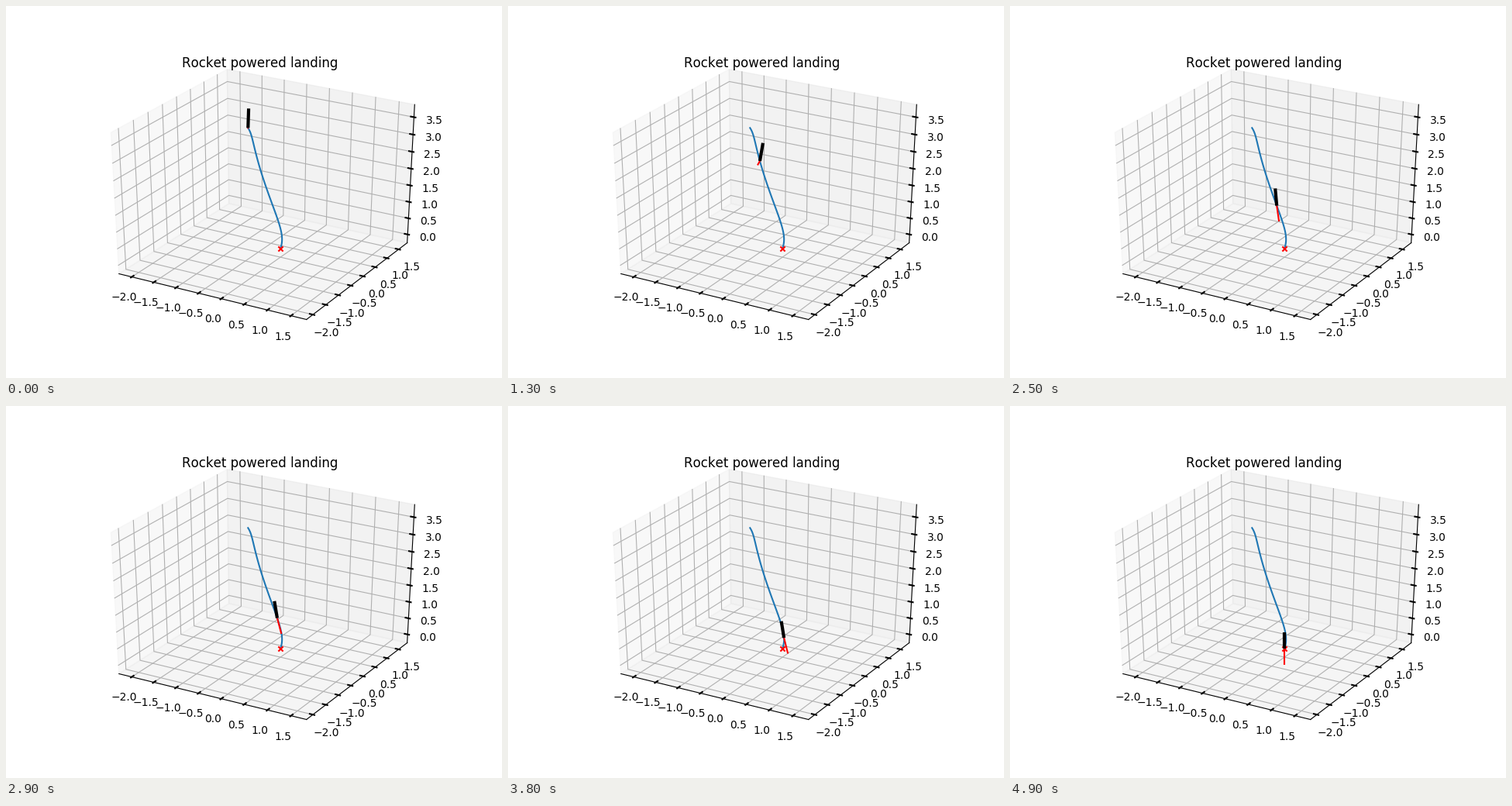
Animation, 640 px wide and 480 px high, one loop 5 s. Source, as a matplotlib script:

```python
import numpy as np
import matplotlib.pyplot as plt
from matplotlib.animation import FuncAnimation

WIDTH, HEIGHT, DPI = 640, 480, 100
FRAMES, INTERVAL = 50, 100

# Data space is a cube of side SPAN around CENTER, seen in perspective.
SPAN = 3.955
CENTER = np.array([-0.2337, -0.184, SPAN / 2.2])
ELEV, AZIM, DIST = np.radians(30), np.radians(-60), 10
EDGE = 0.5 + 1 / 48
DELTA = 1 / 12
LABEL_GAP = 0.0738

RIGHT = np.array([-np.sin(AZIM), np.cos(AZIM), 0])
TOWARD = np.array([np.cos(ELEV) * np.cos(AZIM), np.cos(ELEV) * np.sin(AZIM), np.sin(ELEV)])
UP = np.cross(TOWARD, RIGHT)


def project(points):
    """Unit-cube points (centred on zero) to stage pixels, y down."""
    p = np.atleast_2d(points)
    depth = DIST - p @ TOWARD
    x = 80 + 496 * ((p @ RIGHT) / depth + 0.095) / 0.185
    y = 427.2 - 369.6 * ((p @ UP) / depth + 0.095) / 0.185
    return np.column_stack([x, y])


plt.rcParams.update({"font.family": "DejaVu Sans", "text.kerning_factor": 6})
fig = plt.figure(figsize=(WIDTH / DPI, HEIGHT / DPI), dpi=DPI, facecolor="white")
ax = fig.add_axes([0, 0, 1, 1])
ax.set(xlim=(0, WIDTH), ylim=(HEIGHT, 0))
ax.axis("off")


def draw_line(points, **style):
    ax.plot(*project(points).T, **style)


def draw_pane(axis, side, gray):
    square = [(-EDGE, -EDGE), (EDGE, -EDGE), (EDGE, EDGE), (-EDGE, EDGE)]
    corners = [np.insert(corner, axis, side) for corner in square]
    ax.fill(*project(corners).T, color=(gray, gray, gray, 0.5), lw=1, zorder=0)


def draw_axis(axis, edge, grid, tick_dir, ticks):
    """Axis line along `edge`, with grid lines, ticks and labels."""
    edge = np.array(edge)

    def at(value, corner):
        point = np.array(corner, float)
        point[axis] = value
        return point

    draw_line([at(-EDGE, edge), at(EDGE, edge)], color="black", lw=0.8, zorder=2)
    outward = np.eye(3)[tick_dir] * np.sign(edge[tick_dir]) * DELTA
    for tick in ticks:
        pos = (tick - CENTER[axis]) / SPAN
        foot = at(pos, edge)
        draw_line([at(pos, corner) for corner in grid], color="#b0b0b0", lw=0.8, zorder=1)
        draw_line([foot + 0.1 * outward, foot - 0.2 * outward], color="black", lw=1.5, zorder=2)
        x, y = project(foot + np.sign(edge) * LABEL_GAP)[0]
        ax.text(x, y, f"{tick:.1f}".replace("-", "\u2212"), ha="center", va="top", fontsize=10)


draw_pane(0, -EDGE, 0.95)
draw_pane(1, EDGE, 0.90)
draw_pane(2, -EDGE, 0.925)

E = EDGE
side_ticks = np.arange(-2, 1.6, 0.5)
draw_axis(0, (0, -E, -E), [(0, -E, -E), (0, E, -E), (0, E, E)], 1, side_ticks)
draw_axis(1, (E, 0, -E), [(E, 0, -E), (-E, 0, -E), (-E, 0, E)], 0, side_ticks)
draw_axis(2, (E, E, 0), [(-E, -E, 0), (-E, E, 0), (E, E, 0)], 0, np.arange(0, 3.6, 0.5))
ax.text(328, 78.8, "Rocket powered landing", ha="center", va="baseline", fontsize=12)

# Key poses (step, base x, base y, sideways lean), joined by one smooth polynomial.
POSES = np.array([
    (0, 312.3, 157.3, 0.8),
    (5, 317.3, 169.5, 2),
    (13, 325, 200, 4),
    (25, 344.2, 257.6, -2),
    (34, 354.7, 289.5, -4.2),
    (43, 355.5, 308, -1.9),
    (49, 354.2, 313.2, 0),
])
steps = np.arange(FRAMES)
progress = steps / (FRAMES - 1)
coefs = np.polyfit(POSES[:, 0] / (FRAMES - 1), POSES[:, 1:], len(POSES) - 1)
path_x, path_y, lean = (np.polyval(c, progress) for c in coefs.T)
base = np.column_stack([path_x, path_y])

# The body foreshortens less as it descends; the engine throttles up to full.
body = np.column_stack([lean, -21.2 - 3.8 * (1 - progress) ** 2])
throttle = np.clip((steps - 9) / 15, 0.05, 1)
thrust = np.column_stack([-1.45 * lean * np.sqrt(throttle), 20.3 * throttle])

ax.plot(path_x, path_y, color="#1f77b4", lw=1.5, zorder=3)
ax.scatter(*base[-1], s=20, c="red", marker="x", linewidths=1.5, zorder=4)
flame, = ax.plot([], [], color="red", lw=1.5, solid_capstyle="butt", zorder=5)
rocket, = ax.plot([], [], color="black", lw=3, solid_capstyle="butt", zorder=6)


def update(k):
    for line, offset in ((rocket, body), (flame, thrust)):
        line.set_data(*np.array([base[k], base[k] + offset[k]]).T)
    return rocket, flame


anim = FuncAnimation(fig, update, frames=FRAMES, interval=INTERVAL, repeat=True, repeat_delay=0)
plt.show()
```
